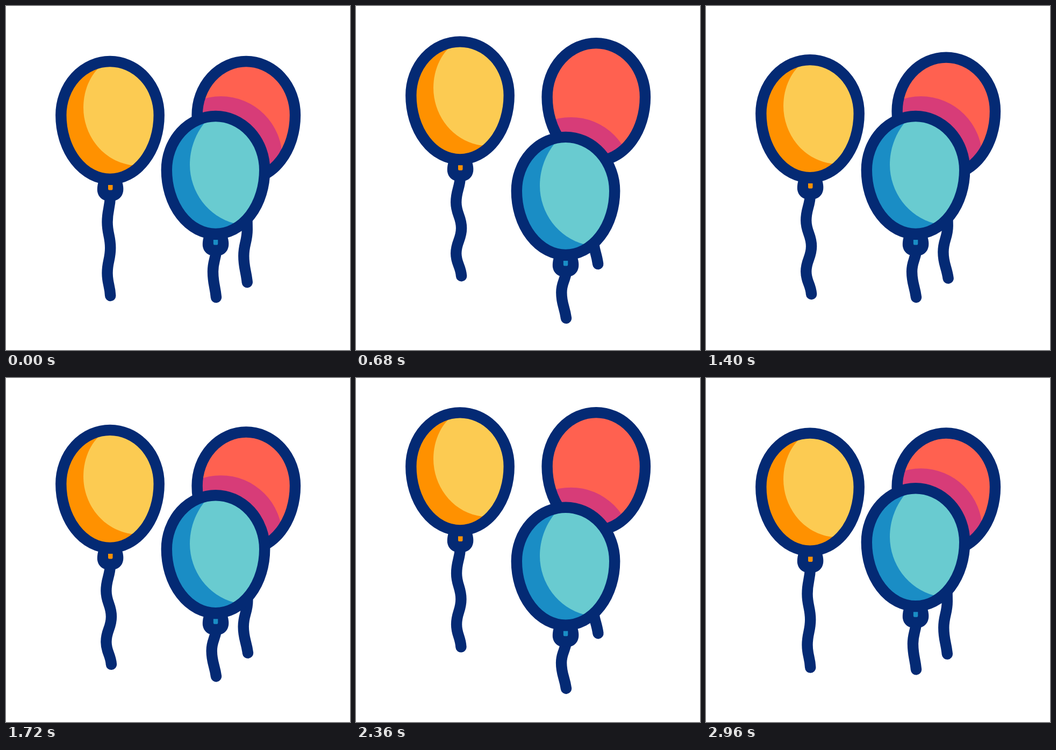
Recreate the animation shown at these times as an HTML page. Size 640 px wide and 640 px high, loop 3000 ms.

```html
<!DOCTYPE html>
<html lang="en">
<head>
<meta charset="utf-8">
<title>Balloons</title>
<style>
  html, body { margin: 0; width: 100%; height: 100%; overflow: hidden; background: #fff; }
  svg { display: block; width: 100%; height: 100%; }
  .line { fill: none; stroke: #042a74; stroke-width: 20.4; stroke-linecap: round; stroke-linejoin: round; }
  .knot { fill: #042a74; }
</style>
</head>
<body>
<svg viewBox="0 0 640 640">
  <defs>
    <path id="egg" d="M0-100A91.200 100 0 0 1 91.200 0A91.200 119 0 0 1-91.200 0A91.200 100 0 0 1 0-100Z"/>
    <path id="knot" d="M-20 119C-23.500 129-24 136-23.500 142C-22 152-14 159-6 159H7C15 159 23 152 24.500 142C25.500 136 24.500 129 21 119Z"/>
    <path id="hole" d="M-3.500 130H5V137Q5 139.500 3 139.500H-1.500Q-3.500 139.500-3.500 137Z"/>
    <clipPath id="inside"><use href="#egg"/></clipPath>
  </defs>

  <g id="yellow">
    <path class="line"/>
    <use href="#egg" fill="#ff9100"/>
    <path clip-path="url(#inside)" fill="#fccb52"
      d="M-4-101C-34-84-49.500-49-49.500-14C-49.500 38-13 86 40 93L100 95V-110Z"/>
    <use href="#egg" class="line"/>
    <use href="#knot" class="knot"/>
    <use href="#hole" fill="#ff9100"/>
  </g>

  <g id="red">
    <path class="line"/>
    <use href="#egg" fill="#ff6150"/>
    <g clip-path="url(#inside)"><circle id="shade" cx="-47" r="114" fill="#d73c78"/></g>
    <use href="#egg" class="line"/>
    <use href="#knot" class="knot"/>
  </g>

  <g id="blue">
    <path class="line"/>
    <use href="#egg" fill="#1a8dc5"/>
    <path clip-path="url(#inside)" fill="#69cbd0"
      d="M-7-102C-32-80-48-46-48-10C-48 41-14 87 35 99.500L100 105V-110Z"/>
    <use href="#egg" class="line"/>
    <use href="#knot" class="knot" x="-.5"/>
    <use href="#hole" x="-.7" fill="#1a8dc5"/>
  </g>
</svg>
<script>
const LOOP = 3000, STEP = 40, TRAVEL = 39;

// Eased value at time t from [time, value] keys
function keyed(t, keys) {
  const i = keys.findIndex(k => k[0] > t);
  const [t0, v0] = keys[i - 1], [t1, v1] = keys[i];
  const x = (t - t0) / (t1 - t0);
  return v0 + (v1 - v0) * x * x * (3 - 2 * x);
}

// Two swings: peak, rest, peak, rest
const swing = (t, peak, rest, peak2) =>
  TRAVEL * keyed(t, [[0, 0], [peak, 1], [rest, 0], [peak2, 1], [LOOP, 0]]);

// Wavy line through the points: upright at each bend, leaning at both ends
function wave(points, lean) {
  const last = points.length - 1;
  return points.map(([x, y], i) => {
    if (!i) return `M${x} ${y}`;
    const [px, py] = points[i - 1], h = (y - py) * 0.45;
    const fromX = i === 1 ? px + (x - px) * lean : px;
    const toX = i === last ? x - (x - px) * lean : x;
    return `C${fromX} ${py + h} ${toX} ${y - h} ${x} ${y}`;
  }).join("");
}

function pose(id, x, y, points, lean) {
  const g = document.getElementById(id);
  g.setAttribute("transform", `translate(${x} ${y})`);
  g.querySelector("path").setAttribute("d", wave(points, lean));
}

function draw(t) {
  const yellowUp = swing(t, 800, 1520, 2320);
  const redUp = swing(t, 880, 1600, 2390);
  const blueDown = swing(t, 700, 1400, 2220);

  // How far each string bends
  const a = keyed(t, [[0, 0], [1000, 1], [1400, .75], [2040, .65], [LOOP, 0]]);
  const b = Math.sin(Math.PI * t / 1000) ** 2;
  const c = keyed(t, [[0, 0], [450, 1], [1000, .7], [1400, .65], [2040, .9], [2500, 1], [LOOP, 0]]);

  pose("yellow", 193.5, 203 - yellowUp, [
    [.5, 152], [-5 - 3 * a, 199], [.7 + 2.5 * a, 247], [-5 - 3 * a, 294], [.7 + 2.5 * a, 336]
  ], .15);
  pose("red", 446.8, 203 - redUp, [
    [0, 150], [2 + b, 213], [-4.5 - b, 262], [2 + 2 * b, 311]
  ], .35);
  pose("blue", 390, 305 + blueDown, [
    [1, 152], [-5 - 3 * c, 189], [1, 237]
  ], .35);
  // The shadow on the red balloon follows the blue one
  document.getElementById("shade").setAttribute("cy", 79 + blueDown + redUp);
}

const start = performance.now();
function tick() {
  const t = (performance.now() - start) % LOOP;
  draw(Math.floor(t / STEP) * STEP);
  requestAnimationFrame(tick);
}
tick();
</script>
</body>
</html>
```
